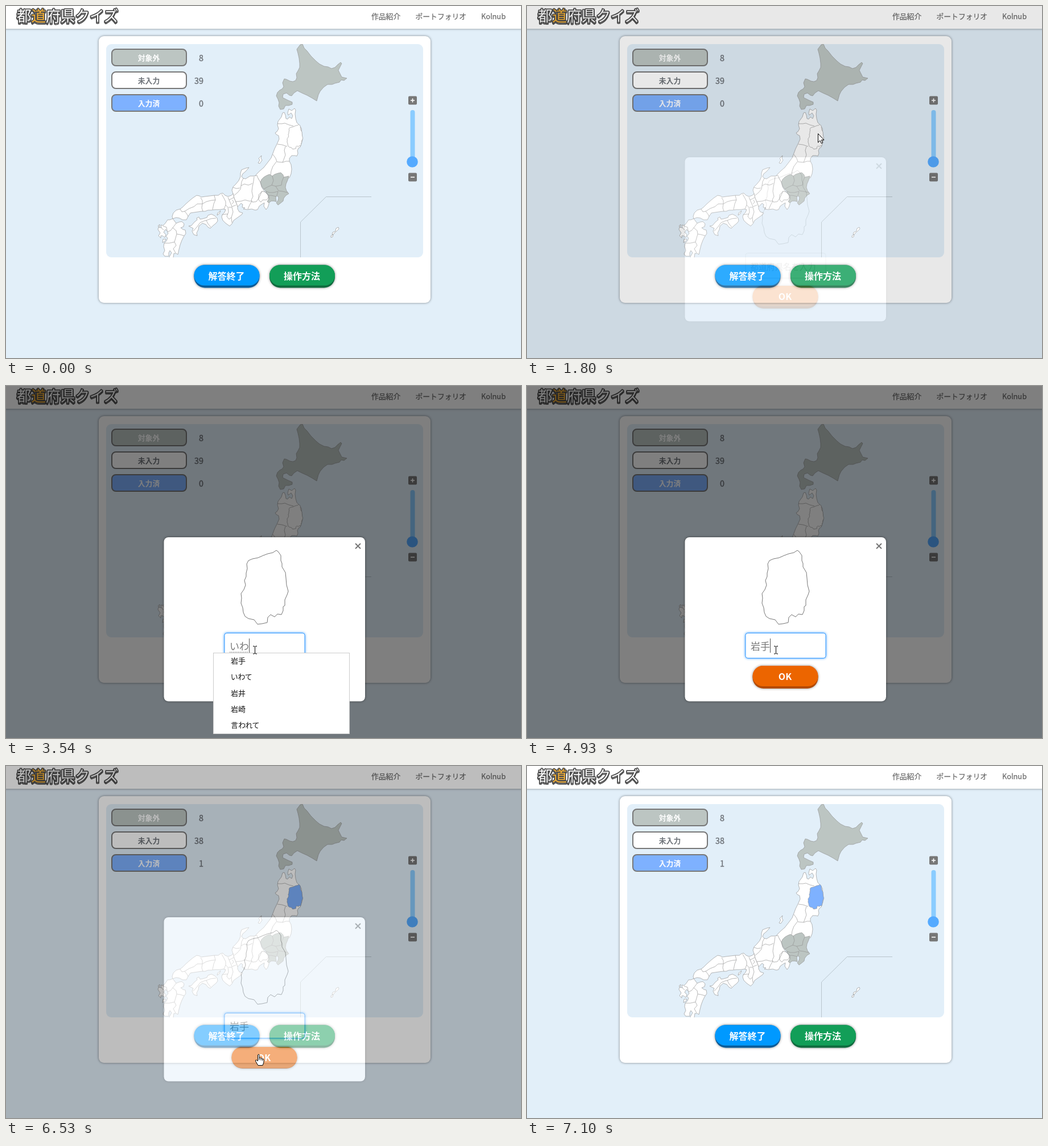
An HTML page that plays this animation: 905x619 px, repeating every 7330 ms.

```html
<!DOCTYPE html>
<html lang="ja">
<head>
<meta charset="utf-8">
<title>都道府県クイズ</title>
<style>
html, body { margin: 0; width: 100%; height: 100%; overflow: hidden; background: #e2eff9; }
svg { display: block; font-family: "Noto Sans CJK JP", "Noto Sans", sans-serif; }
.mid { text-anchor: middle; }
.bold { font-weight: 700; }
.soft { filter: drop-shadow(0 0 2px rgba(0,0,0,.45)); }
.nav { font-size: 12.8px; fill: #6c6c6c; stroke: #6c6c6c; stroke-width: .25; }
.title { font-size: 25.6px; font-weight: 500; fill: #fff; stroke: #4d4d4d; stroke-width: 3.4px;
  stroke-linejoin: round; paint-order: stroke; }
.land { fill: #fff; stroke: #929292; stroke-width: .65; stroke-linejoin: round; }
.line { fill: none; }
.off { fill: #bcc5c2; }
.count { font-size: 14.4px; fill: #70757b; stroke: #70757b; stroke-width: .4; text-anchor: end; }
.list { font-size: 13px; fill: #111; font-feature-settings: "palt"; }
</style>
</head>
<body>
<svg width="905" height="619" viewBox="0 0 905 619">
  <defs>
    <clipPath id="panel"><rect x="176" y="67" width="557" height="375" rx="9"/></clipPath>
    <path id="iwate" vector-effect="non-scaling-stroke" d="M475,289 469,293 460,295 452,298 443,302 433,304 426,307 423,313 424,321 422,329 422,335 419,342 421,350 418,358 413,365 414,373 413,382 416,390 417,398 420,405 426,409 436,411 442,419 450,418 459,416 460,407 465,402 472,406 477,401 484,402 487,395 487,388 490,386 490,376 494,367 496,361 493,350 492,338 491,328 485,318 485,312 483,307 483,298 478,291Z"/>
  </defs>
  <rect width="905" height="619" fill="#e2eff9"/>
  <rect class="soft" x="-5" y="-5" width="915" height="45" fill="#fff"/>
  <g class="title">
    <text x="19" y="28.5">都道府県クイズ</text>
    <text x="19" y="26.5">都<tspan fill="#f9b233">道</tspan>府県クイズ</text>
  </g>
  <g class="nav">
    <text x="642" y="23">作品紹介</text>
    <text x="719.5" y="23">ポートフォリオ</text>
    <text x="835" y="23">Kolnub</text>
  </g>
  <rect class="soft" x="163" y="53" width="583" height="469" rx="9" fill="#fff"/>
  <rect x="176" y="67" width="557" height="375" rx="9" fill="#e2eff9"/>

  <g class="land" clip-path="url(#panel)">
    <path class="off" d="M517,68 521,67 524,74 529,79 536,88 545,97 551,102 559,106 566,107 572,110 578,108 583,103 588,99 590,101 587,107 584,113 587,119 590,125 599,127 594,131 589,130 586,134 578,136 573,138 565,138 558,143 552,150 549,156 546,167 538,162 529,157 520,153 512,149 506,153 502,158 498,157 493,153 487,155 486,161 490,163 496,166 503,169 503,173 497,175 491,175 488,181 482,182 479,176 480,170 478,164 475,158 477,152 481,148 485,146 488,142 486,135 489,128 493,129 499,132 504,133 509,131 511,126 510,119 513,114 516,108 516,101 515,92 513,83 511,76Z"/>
    <!-- north -->
    <path d="M486,188 489,187 491,192 492,198 495,199 498,195 502,198 504,193 501,188 496,192 495,188 497,181 502,184 507,180 509,183 508,190 509,198 511,205 515,209 519,215 520,226 521,235 519,242 517,248 514,250 512,254 513,259 511,264 508,263 502,263 498,268 498,273 501,279 502,287 501,295 498,302 488,304 470,302 453,306 447,311 443,303 437,300 440,296 446,290 453,284 460,275 466,267 469,259 472,251 476,243 480,234 479,228 475,226 473,223 476,221 479,216 477,209 478,203 481,199 484,195Z"/>
    <path class="line" d="M477,207 485,207 490,206 497,209 505,211 M477,243 485,244 494,247 M491,247 489,254 491,262 488,270 486,275 492,273 498,273 M469,261 474,268 476,274 486,275 M475,274 469,282 466,290 465,297"/>
    <path d="M449,263 448,268 450,271 446,277 443,276 446,271 444,268Z"/>
    <!-- middle -->
    <path d="M441,298 435,299 429,299 424,302 421,304 417,303 414,300 416,295 421,291 427,284 422,285 414,288 412,294 412,300 409,307 404,313 399,318 397,324 399,330 401,338 404,345 407,353 409,351 413,347 416,349 415,354 420,355 417,357 424,358 432,357 438,359 442,358 445,352 449,349 454,346 453,352 457,358 460,354 462,348 462,340 460,332 454,326 449,318 447,310 443,303Z"/>
    <path class="line" d="M436,300 435,308 433,318 432,326 434,335 431,341 433,345 440,344 444,338 447,332 450,325 M417,303 414,309 413,316 419,313 426,315 433,312 M413,316 412,322 407,328 401,333 M399,319 405,321 411,320 M404,344 414,343 420,341 427,343 432,343 428,350 425,357 M444,332 450,326 457,327 462,335 458,341 451,341 448,345 444,341Z"/>
    <!-- west -->
    <path d="M399,330 396,333 390,335 385,333 381,329 377,330 373,333 366,333 358,334 350,335 343,336 340,334 335,333 329,337 324,341 316,348 310,354 306,357 299,359 294,364 292,370 293,374 299,372 305,373 310,376 317,376 320,370 324,364 330,363 337,362 344,361 350,361 355,359 361,359 368,358 376,358 382,357 386,358 384,363 380,367 379,371 381,377 386,382 393,387 397,383 400,377 407,372 414,367 416,364 410,362 407,357 407,353 404,345 401,338Z"/>
    <path class="line" d="M390,336 392,341 400,337 M392,341 395,348 397,353 404,350 M398,341 400,345 397,348 M379,331 383,338 386,344 386,350 390,354 391,362 388,370 392,375 396,372 399,362 397,354 391,354 M380,367 386,366 390,366 M396,372 397,381 M386,350 383,357"/>
    <path class="line" d="M366,333 368,341 365,348 363,358 M368,341 360,342 352,344 345,348 M342,337 345,342 345,348 344,355 346,361 M345,348 336,348 330,353 322,356 314,361 318,366 320,370 M306,357 309,362 314,361"/>
    <path d="M377,360 375,365 371,368 372,364Z"/>
    <!-- south -->
    <path d="M321,387 326,386 331,380 336,376 335,373 339,371 341,375 346,374 353,372 355,368 361,366 367,369 371,373 372,378 369,382 364,386 359,391 355,389 351,384 345,382 339,387 338,393 335,399 336,404 330,402 327,396 329,391Z"/>
    <path class="line" d="M329,396 336,388 341,381 348,378 352,377 360,374 369,373 M352,377 355,383 360,389"/>
    <path d="M293,374 296,378 299,382 304,380 309,379 313,383 312,388 307,390 311,393 315,394 316,400 312,406 309,412 306,420 304,428 302,437 299,435 295,435 294,442 288,446 287,441 291,434 288,430 286,434 286,440 279,440 276,436 279,430 277,423 278,417 282,413 284,408 281,405 285,400 283,395 280,393 277,398 281,402 279,407 275,404 272,404 272,408 268,404 271,399 267,393 268,389 273,390 272,385 276,386 280,382 284,376 288,376Z"/>
    <path class="line" d="M276,387 282,389 283,395 M299,382 296,386 293,390 289,395 284,397 M293,390 299,395 300,401 306,402 313,404 M300,401 298,408 296,415 287,417 278,417 M296,415 299,421 294,427 298,434 M273,390 277,394"/>
    <path d="M276,410 281,410 279,414 275,416Z M267,387 270,384 269,389Z M584,389 585,392 581,396 578,398 576,401 573,402 574,398 579,396 580,391Z M571,404 575,402 574,406 571,407Z"/>
    <path class="off" d="M447,310 449,305 453,301 458,298 463,296 468,299 472,296 478,294 483,293 487,297 488,301 493,300 497,299 495,306 492,313 491,319 493,325 497,330 492,333 488,338 487,343 482,347 478,350 475,346 478,342 479,337 476,333 474,337 475,344 471,343 466,343 462,346 459,344 462,339 462,333 458,329 457,326 453,322 450,318Z"/>
    <path class="line" d="M468,299 470,307 467,315 M453,322 460,318 467,315 474,317 484,315 485,308 488,301 M474,317 479,325 486,326 495,328 M457,326 463,328 470,328 478,326 M462,333 466,333 475,335 M478,326 476,333"/>
    <use id="region" href="#iwate" transform="translate(356.3 112) scale(.33333)"/>
  </g>
  <path class="line" stroke="#b9c5cd" d="M642,335.5H562.5L517.5,380V442"/>

  <g id="labels"></g>
  <g fill="#777">
    <rect x="707" y="158.5" width="15" height="15" rx="2"/>
    <rect x="707" y="293.5" width="15" height="15" rx="2"/>
    <path d="M711,166h7M714.5,162.5v7M711,301h7" stroke="#fff" stroke-width="1.6"/>
  </g>
  <rect x="710.5" y="183" width="8" height="92" rx="4" fill="#8accff"/>
  <circle cx="714" cy="274" r="9.8" fill="#55aaff"/>
  <g id="buttons"></g>

  <g id="modal">
    <rect width="905" height="619" opacity=".5"/>
    <rect class="soft" x="277.5" y="266" width="353.5" height="288.5" rx="8" fill="#fff"/>
    <path d="M614,277l9,9m0,-9l-9,9" stroke="#777" stroke-width="2"/>
    <use href="#iwate" fill="none" stroke="#777"/>
    <rect id="glow" x="384" y="434.5" width="141" height="44" rx="4" fill="#fff" stroke="#3399ff" style="filter:drop-shadow(0 0 2px #3399ff)"/>
    <rect id="field" x="384" y="434.5" width="141" height="44" rx="4" fill="#fff" stroke="#ccc"/>
    <text id="hint" x="392.5" y="463.5" font-size="14.4" fill="#aaa">都道府県名を入力</text>
    <text id="typed" x="393" y="463.5" font-size="17" fill="#777"></text>
    <path id="under" stroke="#666"/>
    <rect id="caret" y="444" width="1" height="25" fill="#555"/>
    <g id="ok"></g>
  </g>

  <g id="popup">
    <rect id="box" x="364.5" y="469.5" height="142" fill="#fff" stroke="#ccc"/>
    <g id="items" class="list"></g>
  </g>

  <g id="cursor" stroke="#000" stroke-linejoin="round">
    <path id="arrow" fill="#fff" d="M.5,.5V16L4,12.6 6.3,17.5 8.6,16.5 6.4,11.6H11Z"/>
    <path id="beam" fill="none" d="M-3,-6.5H-1L.5,-5.5 2,-6.5H4M.5,-5.5V6M-3,7H-1L.5,6 2,7H4"/>
    <path id="hand" fill="#fff" d="M-.5,1Q1,-1 2,1V6.5Q4,5.5 5,7Q7,6 7.5,8Q10,7.5 10,10V14L8,19.5H0L-4.5,12Q-5,9.5 -2.5,10L-.5,12ZM2,6.5V10M5,7.5V10.5M7.5,8.5V11"/>
  </g>
</svg>
<script>
const LOOP = 7330;
const $ = id => document.getElementById(id);
const set = (id, attrs) => { for (const k in attrs) $(id).setAttribute(k, attrs[k]); };
const show = (id, on) => set(id, { display: on ? 'inline' : 'none' });
const between = (t, a, b) => t >= a && t < b;
const ramp = (t, a, b) => Math.min(1, Math.max(0, (t - a) / (b - a)));
const swing = p => .5 - Math.cos(Math.PI * p) / 2;

const label = (text, y, fill, ink, id) => `
  <rect x="186" y="${y}" width="131" height="29" rx="7" fill="${fill}" stroke="#777" stroke-width="2"/>
  <text class="mid bold" x="251" y="${y + 20}" font-size="12.8" fill="${ink}">${text}</text>
  <text class="count" id="${id}" x="347" y="${y + 20.5}"></text>`;

const button = (x, y, face, edge, text, sink = 0) => `<g class="soft">
  <rect x="${x}" y="${y + sink}" width="115" height="${40 - sink}" rx="19" fill="${edge}"/>
  <rect x="${x}" y="${y + sink}" width="115" height="${36 + sink / 2}" rx="18" fill="${face}"/></g>
  <text class="mid bold" x="${x + 57}" y="${y + 25 + sink}" font-size="16" fill="#fff">${text}</text>`;

$('labels').innerHTML = label('対象外', 76, '#bcc5c2', '#fff', 'skipped')
  + label('未入力', 116, '#fff', '#70757b', 'left')
  + label('入力済', 156, '#7eb1ff', '#fff', 'done');
$('buttons').innerHTML = button(330.5, 455.5, '#0099ff', '#0a5c99', '解答終了')
  + button(463, 455.5, '#129e58', '#0f6b3e', '操作方法');
$('skipped').textContent = 8;

// start, end, from, to, easing
const moves = [
  [410, 1140, [897, 523], [540, 217], swing],
  [1140, 1440, [540, 217], [511, 224], swing],
  [1880, 2280, [511, 224], [437, 464], swing],
  [5780, 6060, [437, 464], [443, 507], swing],
  [6800, 7100, [443, 507], [575, 637], p => p ** 1.5],
];
const typing = [
  [0, ''], [3250, 'い'], [3430, 'いｗ'], [3490, 'いわ'],
  [4020, 'いわｔ'], [4090, 'いわて'], [4540, '岩手'],
];
// start, box width, suggestions
const lists = [
  [0, 0, []],
  [3310, 265, ['いつもお世話になっております。', 'いい', '今', '一応', 'いつも']],
  [3540, 239, ['岩手', 'いわて', '岩井', '岩崎', '言われて']],
  [4150, 239, ['岩手', 'いわて', '岩手県', '言われて', '岩手山']],
  [4280, 164, ['岩手', 'いわて', '岩手県', '言われて', '岩手山']],
  [4540, 0, []],
];
const current = (steps, t) => steps.filter(s => s[0] <= t).pop();

function drawCursor(t) {
  const [a, b, from, to, ease] = current(moves, t) || moves[0];
  const p = ease(ramp(t, a, b));
  const [x, y] = from.map((v, i) => v + (to[i] - v) * p);
  const beam = between(t, 1900, 6000) && y > 435 && y < 479;
  const hand = between(t, 5780, 6740) && y > 492;
  show('cursor', between(t, 410, 7100));
  set('cursor', { transform: `translate(${Math.round(x)} ${Math.round(y)})` });
  show('beam', beam);
  show('hand', hand);
  show('arrow', !beam && !hand);
  return hand;
}

function drawField(t) {
  const text = current(typing, t)[1];
  const end = 393 + 17 * text.length;
  const focus = ramp(t, 2410, 2540);
  set('glow', { opacity: focus });
  set('field', { opacity: 1 - focus });
  show('hint', !text);
  $('typed').textContent = text;
  show('under', between(t, 3250, 4930));
  set('under', { d: `M393,468H${end - 1}`, 'stroke-dasharray': t < 4540 ? '1.5 1.5' : 'none' });
  set('caret', { x: end });
  show('caret', between(t, 2440, 2950) || between(t, 3250, 5470) || between(t, 5970, 6470));
}

function drawList(t) {
  const [, width, words] = current(lists, t);
  show('popup', width > 0);
  set('box', { width });
  $('items').innerHTML = words.map((w, i) =>
    `<text x="395" y="${488 + i * 28.3}">${w}</text>`).join('');
}

function draw(t) {
  const solved = t >= 6320;
  const opacity = swing(ramp(t, 1690, 2090)) * (1 - swing(ramp(t, 6335, 6735)));
  const hover = between(t, 1340, 1690);
  $('left').textContent = solved ? 38 : 39;
  $('done').textContent = solved ? 1 : 0;
  set('region', { fill: solved ? '#7eb1ff' : hover ? '#f8f8f8' : '#fff' });
  show('modal', opacity > 0);
  set('modal', { opacity });
  const pressed = drawCursor(t);
  $('ok').innerHTML = button(396.5, 492, '#ec6500', '#b34a00', 'OK', pressed ? 2 : 0);
  drawField(t);
  drawList(t);
}

const start = performance.now();
function frame() {
  draw((performance.now() - start) % LOOP);
  requestAnimationFrame(frame);
}
frame();
</script>
</body>
</html>
```
